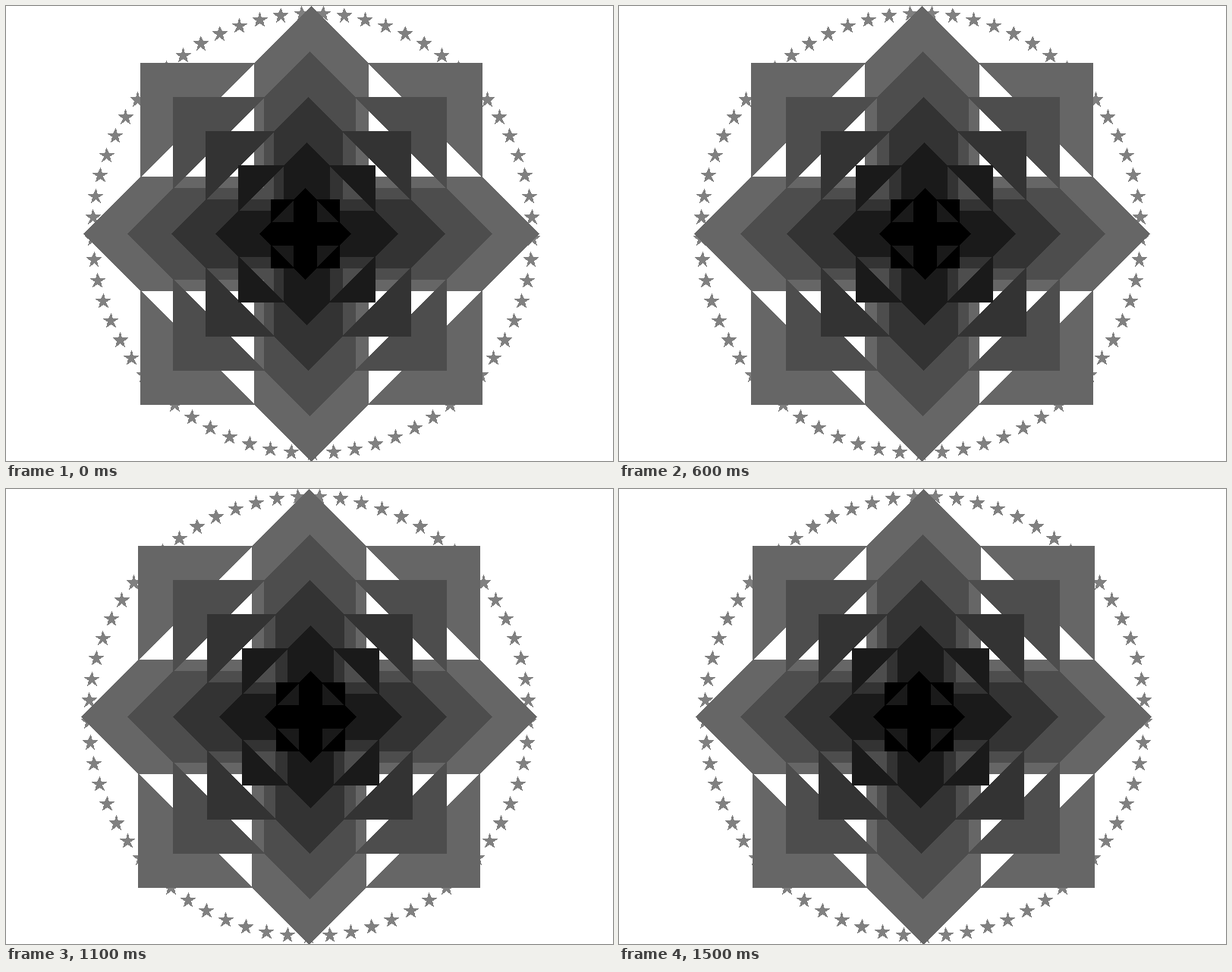
An HTML page for the animation above (1.6 s loop, 800x600 px).

```html
<!DOCTYPE html>
<html lang="en">
<head>
<meta charset="utf-8">
<title>Swaying rosette</title>
<style>
  html, body { margin: 0; width: 100%; height: 100%; overflow: hidden; background: #fff; }
  svg { display: block; width: 800px; height: 600px; }
</style>
</head>
<body>
<svg id="stage" viewBox="0 0 800 600" shape-rendering="crispEdges"></svg>
<script>
const NS = "http://www.w3.org/2000/svg";
const stage = document.getElementById("stage");
const CX = 400.5, CY = 300.5;
const STEP = 100, STEPS = 16;

const poly = pts => "M" + pts.map(p => p.join(" ")).join("L") + "Z";

// Double-ended arrows crossing at the centre, plus four corner triangles.
function rosette(u) {
  const bar = [[0, -4], [1, -3], [1, 3], [0, 4], [-1, 3], [-1, -3]];
  const parts = [bar, bar.map(([x, y]) => [y, x])];
  for (const sx of [-1, 1]) {
    for (const sy of [-1, 1]) {
      parts.push([[3 * sx, 3 * sy], [sx, 3 * sy], [3 * sx, sy]]);
    }
  }
  return parts.map(part => poly(part.map(([x, y]) => [x * u, y * u])));
}

function star(cx, cy, r) {
  const pts = [];
  for (let i = 0; i < 10; i++) {
    const a = i * Math.PI / 5;
    const d = i % 2 ? r * 0.382 : r;
    pts.push([Math.floor(cx + d * Math.sin(a)), Math.floor(cy - d * Math.cos(a))]);
  }
  return poly(pts);
}

function starRing(count, radius, r) {
  return Array.from({ length: count }, (_, i) => {
    const a = i * 2 * Math.PI / count;
    return star(radius * Math.sin(a), radius * Math.cos(a), r);
  });
}

function addLayer(paths, color, sway, join) {
  const g = document.createElementNS(NS, "g");
  g.setAttribute("fill", color);
  g.setAttribute("stroke", color);
  g.setAttribute("stroke-width", 1);
  g.setAttribute("stroke-linejoin", join);
  for (const d of paths) {
    const path = document.createElementNS(NS, "path");
    path.setAttribute("d", d);
    g.appendChild(path);
  }
  stage.appendChild(g);
  return { g, sway };
}

const layers = [addLayer(starRing(65, 290, 10), "#808080", -4, "round")];
["#666666", "#4d4d4d", "#333333", "#1a1a1a", "#000000"].forEach((color, i) => {
  layers.push(addLayer(rosette(75 - 15 * i), color, 2 * i - 2, "miter"));
});

function draw(ms) {
  const k = Math.floor(ms / STEP) % STEPS;
  const wave = 1 - Math.abs(k - STEPS / 2) / (STEPS / 4);
  for (const { g, sway } of layers) {
    const x = CX + Math.floor(sway * wave);
    g.setAttribute("transform", `translate(${x} ${CY})`);
  }
}

function tick(now) {
  draw(now);
  requestAnimationFrame(tick);
}

draw(0);
requestAnimationFrame(tick);
</script>
</body>
</html>
```
